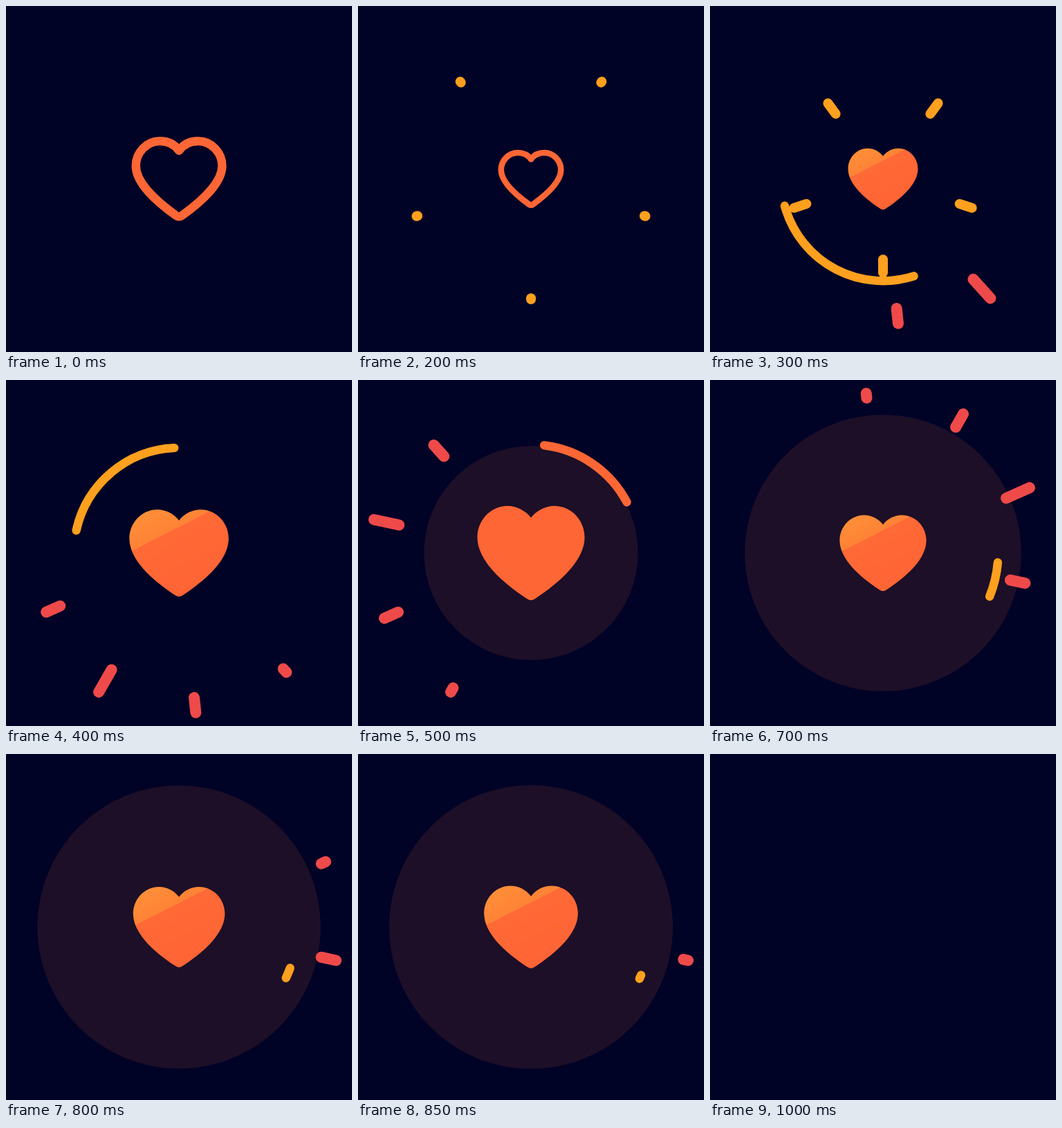
Animation of 500x500 px, one loop 1050 ms. Source, as an HTML page with a canvas:

```html
<!DOCTYPE html>
<html lang="en">
<head>
<meta charset="utf-8">
<title>Heart burst</title>
<style>
  html, body { margin: 0; width: 100%; height: 100%; overflow: hidden; background: #000226; }
  canvas { display: block; width: 100vmin; height: 100vmin; }
</style>
</head>
<body>
<canvas id="stage" width="500" height="500"></canvas>
<script>
const ctx = document.getElementById('stage').getContext('2d');
const LOOP = 1050, STEP = 50, END = 1000;
const ORANGE = '#ff6635', AMBER = '#ffa01e', RED = '#ef4a4a', HALO = '#1d0f27', BACK = '#000226';

// Progress from 0 to 1 over a span of time
const span = (t, start, length) => Math.min(1, Math.max(0, (t - start) / length));
const smooth = (t, start, length) => {
  const u = span(t, start, length);
  return u * u * (3 - 2 * u);
};
const easeOut = (t, start, length) => 1 - (1 - span(t, start, length)) ** 3;
const mix = (a, b, u) => a + (b - a) * u;

// Turning points of the heart's beat: [time, scale]
const beat = [[60, 1], [240, .65], [468, 1.155], [640, .9], [900, 1]];

function heartScale(t) {
  let scale = beat[0][1];
  for (let i = 1; i < beat.length; i++) {
    const start = beat[i - 1][0], [end, next] = beat[i];
    scale = mix(scale, next, smooth(t, start, end - start));
  }
  return scale;
}

const outline = new Path2D(`M0-41C-6-49.5-16-54.7-27.5-54.7C-47-54.7-62.3-38-62.3-19
  C-62.3 6-33 32-4 53Q0 55.5 4 53C33 32 62.3 6 62.3-19
  C62.3-38 47-54.7 27.5-54.7C16-54.7 6-49.5 0-41Z`);
const solid = new Path2D(`M0-45C-7-54-18-60-30-60C-51-60-68.5-42-68.5-20
  C-68.5 9-38 37-5 58.5Q0 62 5 58.5C38 37 68.5 9 68.5-20
  C68.5-42 51-60 30-60C18-60 7-54 0-45Z`);

const shine = ctx.createLinearGradient(-34, -67, 22.5, 44.5);
shine.addColorStop(0, '#ff9038');
shine.addColorStop(.345, '#ff8236');
shine.addColorStop(.345, '#ff6a36');
shine.addColorStop(1, '#ff6435');

// Degrees run clockwise from the top.
const rad = deg => (deg - 90) * Math.PI / 180;

function stroke(color, width) {
  ctx.strokeStyle = color;
  ctx.lineWidth = width;
  ctx.stroke();
}

function spoke(deg, inner, outer, color, width) {
  if (outer - inner < .5) return;
  const x = Math.cos(rad(deg)), y = Math.sin(rad(deg));
  ctx.beginPath();
  ctx.moveTo(x * inner, y * inner);
  ctx.lineTo(x * outer, y * outer);
  stroke(color, width);
}

function drawHalo(t) {
  if (t < 450) return;
  ctx.fillStyle = HALO;
  ctx.beginPath();
  ctx.arc(0, 0, 205 * easeOut(t, 275, 602), 0, Math.PI * 2);
  ctx.fill();
}

// Five sparks fall inwards together.
function drawSparks(t) {
  const inner = mix(174, 100, smooth(t, 185, 165));
  const outer = mix(174, 100, smooth(t, 215, 165));
  for (let i = 0; i < 5; i++) spoke(36 + i * 72, inner, outer, AMBER, 14);
}

// Ten rays shoot outwards, one after another around the circle.
function drawRays(t) {
  for (let i = 0; i < 10; i++) {
    const begin = 250 + i * 50;
    const inner = mix(188, 232, smooth(t, begin, 200));
    const outer = mix(188, 232, smooth(t, begin - 50, 100));
    spoke(138 + i * 36, inner, outer, RED, 16);
  }
}

function drawArc(t, color) {
  const head = mix(-244.5, 115.5, easeOut(t, 206, 625));
  const tail = mix(-244.5, 115.5, easeOut(t, 268, 704));
  if (head - tail < 1) return;
  ctx.beginPath();
  ctx.arc(0, 0, 152 + (t - 400) * .048, rad(tail), rad(head));
  stroke(color, 12.4);
}

function drawHeart(t, scale, fill) {
  ctx.save();
  ctx.scale(scale, scale);
  if (t < 300) {
    ctx.strokeStyle = ORANGE;
    ctx.lineWidth = 12.4;
    ctx.stroke(outline);
  } else {
    ctx.fillStyle = fill;
    ctx.fill(solid);
  }
  ctx.restore();
}

function draw(t) {
  ctx.setTransform(1, 0, 0, 1, 0, 0);
  ctx.fillStyle = BACK;
  ctx.fillRect(0, 0, 500, 500);
  if (t >= END) return;
  ctx.translate(250, 250);
  ctx.lineCap = ctx.lineJoin = 'round';
  const scale = heartScale(t);
  const flat = scale > 1.1; // the swollen heart and the arc share one colour
  drawHalo(t);
  drawSparks(t);
  drawRays(t);
  drawArc(t, flat ? ORANGE : AMBER);
  drawHeart(t, scale, flat ? ORANGE : shine);
}

const start = performance.now();
function tick() {
  const t = (performance.now() - start) % LOOP;
  draw(Math.floor(t / STEP) * STEP);
  requestAnimationFrame(tick);
}
tick();
</script>
</body>
</html>
```
